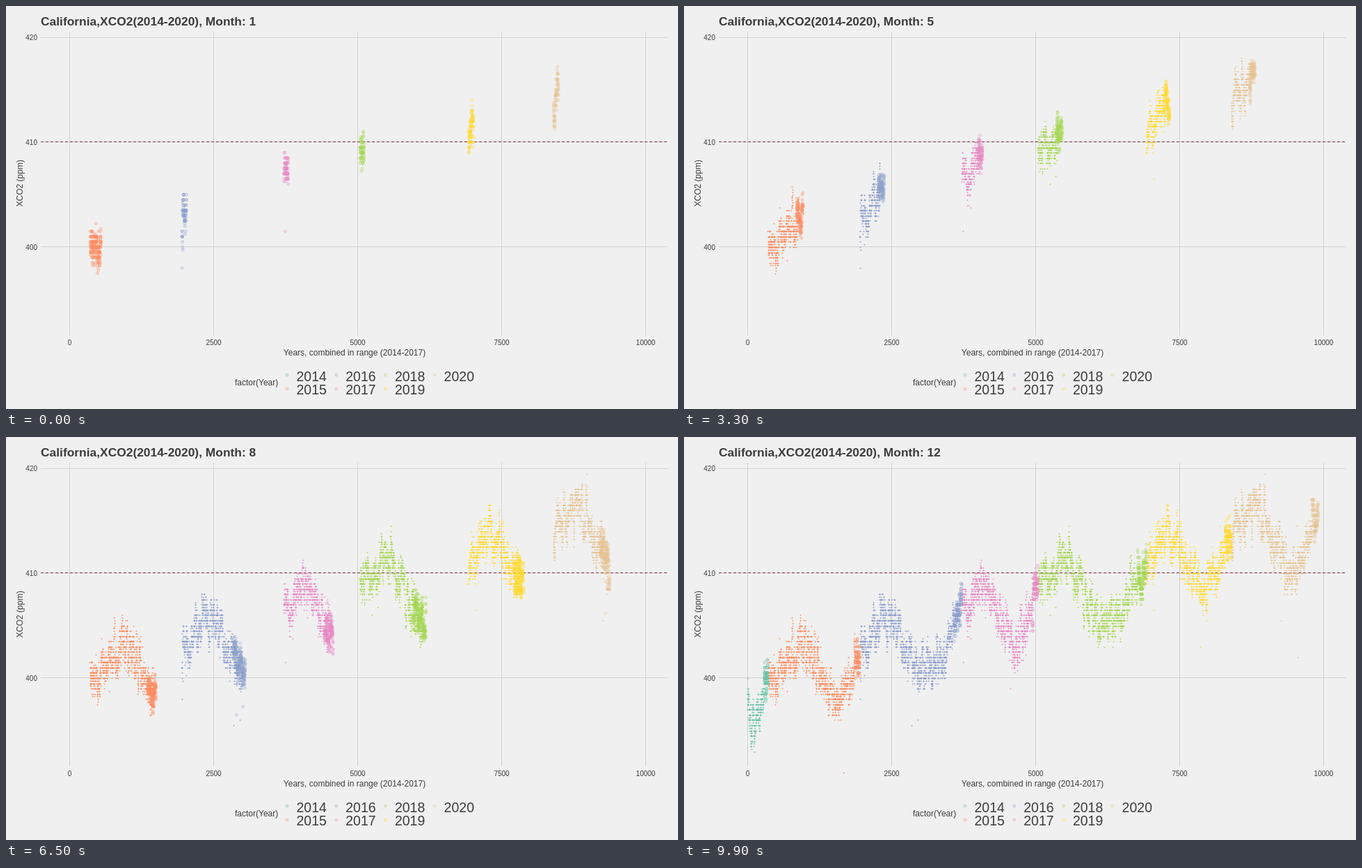
Write an HTML page with a canvas that moves like this. It is 966 px wide and 580 px high and loops after 10000 ms.

```html
<!DOCTYPE html>
<html lang="en">
<head>
<meta charset="utf-8">
<style>
  html, body { margin: 0; width: 100%; height: 100%; overflow: hidden; background: #f0f0f0; }
  svg, canvas { position: absolute; left: 0; top: 0; }
  text { font-family: "Liberation Sans", Arial, sans-serif; fill: #3c3c3c; }
</style>
</head>
<body>
<svg id="chart" width="966" height="580">
  <text id="title" x="50" y="28" font-size="17.4" font-weight="bold"></text>
  <text x="501" y="503" font-size="12" text-anchor="middle">Years, combined in range (2014-2017)</text>
  <text transform="translate(24 255) rotate(-90)" font-size="12" text-anchor="middle">XCO2 (ppm)</text>
  <text x="329" y="546" font-size="12">factor(Year)</text>
</svg>
<canvas id="plot" width="966" height="580"></canvas>
<script>
const chart = document.getElementById('chart');
const title = document.getElementById('title');
const ctx = document.getElementById('plot').getContext('2d');
const LEFT = 91.5, STEP = 0.0828, FIRST_MONTH = 8;

// Each January: left edge in pixels, ppm level, and skew of the rows within the year
const years = [
  { x: 42.5, ppm: 401.5, skew: 1, color: '#66c2a5' },
  { x: 121, ppm: 400.7, skew: 0.75, color: '#fc8d62' },
  { x: 253, ppm: 403, skew: 1.1, color: '#8da0cb' },
  { x: 399.5, ppm: 406.8, skew: 1, color: '#e78ac3' },
  { x: 509, ppm: 408.6, skew: 1.15, color: '#a6d854' },
  { x: 665, ppm: 411.2, skew: 1, color: '#ffd92f' },
  { x: 787, ppm: 414.4, skew: 1, color: '#e5c494' },
  { x: 912, ppm: 415.8 }];

let seed = 2014;
function rand() {
  seed = (seed + 0x6D2B79F5) | 0;
  let r = Math.imul(seed ^ seed >>> 15, 1 | seed);
  r = r + Math.imul(r ^ r >>> 7, 61 | r) ^ r;
  return ((r ^ r >>> 14) >>> 0) / 4294967296;
}
const noise = () => (rand() + rand() + rand() - 1.5) * 2;
const mix = (a, b, t) => a + (b - a) * t;
const wave = turns => Math.sin(turns * 2 * Math.PI);
const toY = ppm => 196 - (ppm - 410) * 15.1;

// Share of a year's rows taken before part u of the year; late summer has the most
const share = u => u + 0.06 * (wave(u - 0.65) + wave(0.65));
// Rise until May, low in October
const season = u => 2.8 * wave(u) + wave(2 * u + 0.36) - 1.17;

// Rows come in daily groups; values lie on quarter steps
function makeMonth(year, next, m) {
  const row = u => Math.round((mix(year.x, next.x, share(u) ** year.skew) - LEFT) / STEP);
  const first = row(m / 12), last = row((m + 1) / 12), points = [];
  let day = noise();
  for (let i = first; i < last; i++) {
    if (i % 28 === 0) day = noise();
    const u = (m + (i - first) / (last - first)) / 12;
    const spread = rand() < 0.005 ? 3.5 : 0.7;
    const grain = rand() < 0.5 ? 2 : 4;
    const ppm = mix(year.ppm, next.ppm, u) + season(u) + day * 0.9 + noise() * spread;
    points.push({ x: LEFT + i * STEP, y: toY(Math.round(ppm * grain) / grain) });
  }
  return { points, color: year.color, number: m + 1 };
}

const months = [];
for (let n = FIRST_MONTH; n < 84; n++) {
  const y = Math.floor(n / 12);
  months.push(makeMonth(years[y], years[y + 1], n % 12));
}

function add(tag, attrs, text = '') {
  const el = document.createElementNS('http://www.w3.org/2000/svg', tag);
  for (const key in attrs) el.setAttribute(key, attrs[key]);
  el.textContent = text;
  chart.append(el);
}
const line = (d, extra) => add('path', { d, stroke: '#d2d2d2', ...extra });
for (let i = 0; i < 5; i++) {
  const x = Math.floor(LEFT + i * 207.1) + 0.5;
  line(`M${x} 37V474`);
  add('text', { x, y: 488, 'font-size': 10, 'text-anchor': 'middle' }, i * 2500);
}
for (let i = 0; i < 3; i++) {
  const y = 45 + i * 150.75;
  line(`M50 ${Math.floor(y) + 0.5}H951`);
  add('text', { x: 45, y: y + 4, 'font-size': 10, 'text-anchor': 'end' }, 420 - i * 10);
}
line('M50 195.5H951', { stroke: '#7a2a45', 'stroke-dasharray': '4 3' });
years.slice(0, 7).forEach(({ color }, i) => {
  const x = 404 + (i >> 1) * 70.7, low = i % 2;
  add('circle', { cx: x, cy: 531 + low * 20, r: 1.9, fill: color, stroke: color, 'fill-opacity': 0.2, 'stroke-opacity': 0.45 });
  add('text', { x: x + 13.5, y: 540 + low * 19, 'font-size': 19.5 }, 2014 + i);
});

function trail({ points, color }) {
  ctx.fillStyle = color;
  ctx.globalAlpha = 0.5;
  for (const p of points) {
    const x = Math.floor(p.x), y = Math.round(p.y);
    ctx.fillRect(x - 1, y, 3, 1);
    ctx.fillRect(x, y - 1, 1, 3);
  }
}

function ring(x, y) {
  ctx.beginPath();
  ctx.arc(x, y, 2, 0, Math.PI * 2);
  ctx.globalAlpha = 0.2;
  ctx.fill();
  ctx.globalAlpha = 0.4;
  ctx.stroke();
}

// Rows pair up by order with the next month; spare rows stay put
function moving(month, next, t) {
  ctx.fillStyle = ctx.strokeStyle = month.color;
  month.points.forEach((a, i) => {
    const b = t && next && next.points[i] || a;
    ring(mix(a.x, b.x, t), mix(a.y, b.y, t));
  });
}

function draw(step) {
  const time = 1 + step / 9, now = Math.floor(time), t = step % 9 / 9;
  title.textContent = 'California,XCO2(2014-2020), Month: ' + Math.round(time);
  ctx.clearRect(0, 0, 966, 580);
  for (const m of months) if (m.number < time) trail(m);
  months.forEach((m, n) => { if (m.number === now) moving(m, months[n + 1], t); });
}

let shown = -1;
function tick() {
  const step = Math.floor(performance.now() / 100) % 100;
  if (step !== shown) draw(shown = step);
  requestAnimationFrame(tick);
}
tick();
</script>
</body>
</html>
```
